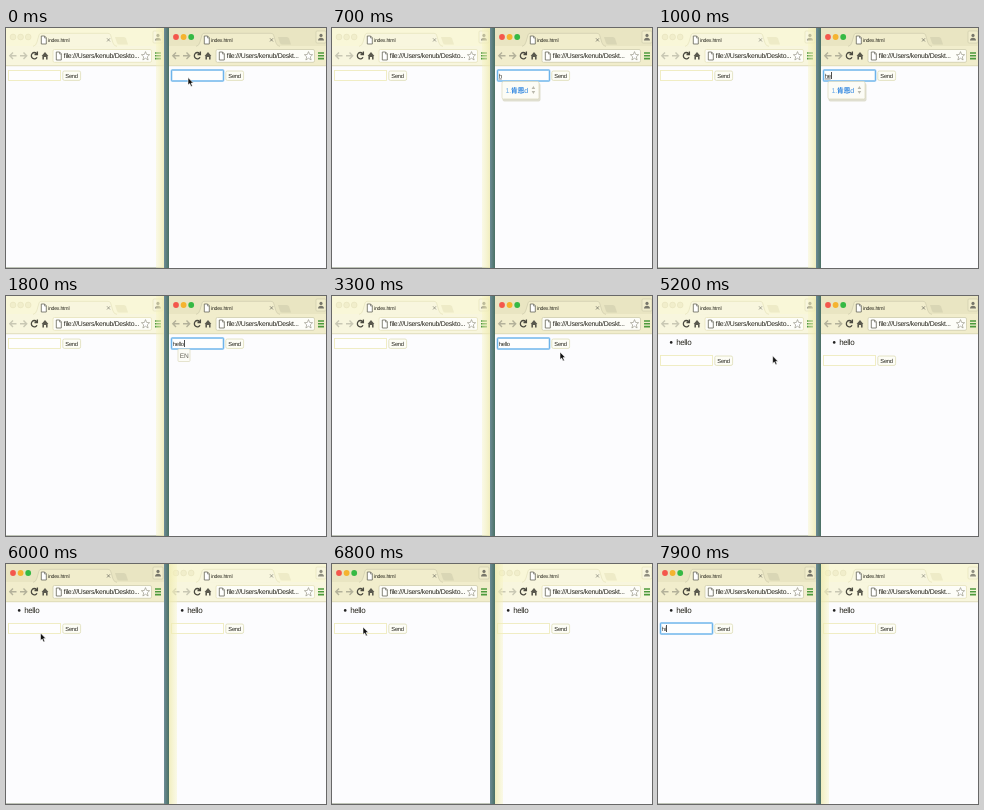
An HTML page that plays this animation: 320x240 px, repeating every 8 s.

```html
<!DOCTYPE html>
<html lang="en">
<head>
<meta charset="utf-8">
<title>Two chat windows</title>
<style>
html, body { margin: 0; width: 100%; height: 100%; overflow: hidden; background: #fcfcfe; }
svg { display: block; width: 320px; height: 240px; }
text { font-family: "Liberation Sans", Arial, sans-serif; fill: #26251c; letter-spacing: -.045em; text-rendering: geometricPrecision; }
.win { --strip: #f9f7d8; --bar: #f8f6de; --edge: #e6e3bc; --icon: #c9c8b4; --ink: #8f8e80; }
.win.active { --strip: #e9e5c2; --bar: #f1edcc; --edge: #cfccac; --icon: #b3b19a; --ink: #77766a; }
.strip { fill: var(--strip); }
.bar { fill: var(--bar); }
.tab { fill: var(--bar); stroke: var(--edge); stroke-width: .7; }
.plus { fill: var(--edge); opacity: .6; }
.light { fill: #f1eecb; stroke: #e2dfb8; stroke-width: .5; }
.active .light { fill: var(--c); stroke: none; }
.line { fill: none; stroke: var(--ink); stroke-width: .8; }
.user { fill: var(--ink); }
.dim { fill: none; stroke: var(--icon); stroke-width: 1.4; }
.dark { fill: none; stroke: #4b4a40; stroke-width: 1.3; }
.url { fill: #fdfdf8; stroke: var(--edge); stroke-width: .8; }
.field { fill: #fefefe; stroke: #efecbe; stroke-width: .9; }
.ring { fill: none; stroke: #6db3ea; stroke-width: 1; }
.glow { fill: none; stroke: #b9dcf6; stroke-width: 2.2; }
.button { fill: #fdfdf6; stroke: #dedcb6; stroke-width: .8; }
.caret { fill: #222; }
.panel { fill: #fcfcf6; stroke: #dbd9bc; stroke-width: .7; }
.candidate { font-size: 7px; font-family: "Liberation Sans", "Noto Sans CJK SC", "Noto Sans CJK", sans-serif; fill: #2f86e0; }
</style>
</head>
<body>
<svg viewBox="0 0 320 240">
  <defs>
    <linearGradient id="shade">
      <stop offset="0" stop-color="#f6f3bc" stop-opacity=".35"/>
      <stop offset="1" stop-color="#eeeab0" stop-opacity=".8"/>
    </linearGradient>
    <linearGradient id="gap">
      <stop offset="0" stop-color="#6c8b96"/>
      <stop offset="1" stop-color="#4a7063"/>
    </linearGradient>
    <g id="page">
      <path d="M0 0H3.3L5 1.8V8H0Z" fill="#fff" stroke="#66655a" stroke-width=".8"/>
      <path d="M3.2 0V2H5" fill="none" stroke="#66655a" stroke-width=".6"/>
    </g>
  </defs>
  <rect x="158" width="5" height="240" fill="url(#gap)"/>
  <g id="windows"></g>
  <rect y="239" width="158" height="1" fill="#bfc4b8"/>
  <rect id="shadowLeft" x="150" width="8" height="240" fill="url(#shade)"/>
  <rect id="shadowRight" x="-171" width="8" height="240" fill="url(#shade)" transform="scale(-1 1)"/>
  <g id="candidates">
    <rect x="170.5" y="55" width="38" height="18.5" rx="2" fill="#a8a578" opacity=".35"/>
    <rect class="panel" x="170" y="53.5" width="37" height="17.5" rx="1.5"/>
    <text class="candidate" x="173.6" y="64.8"><tspan fill-opacity=".7">1.</tspan><tspan font-weight="bold">肯恩</tspan>d</text>
    <path d="M199.6 61L201.4 58L203.2 61ZM199.6 63L201.4 66L203.2 63Z" fill="#b9b8ac"/>
  </g>
  <g id="mode">
    <rect class="panel" x="172" y="53" width="12" height="12.5" rx="1"/>
    <text x="173.8" y="62" font-size="6.6" style="fill:#666558">EN</text>
  </g>
  <path id="pointer" d="M0 0V7.6L1.7 6.1L3 9L4.4 8.4L3.1 5.6H5.4Z" fill="#111" stroke="#fff" stroke-width=".6"/>
</svg>
<script>
const LOOP = 8000;
const $ = id => document.getElementById(id);

function windowMarkup(x, width, address) {
  const lights = ['#f4574c', '#f5b32f', '#35b944'].map((color, i) =>
    `<circle class="light" style="--c:${color}" cx="${7 + i * 7.6}" cy="9" r="2.9"/>`).join('');
  return `<g class="win" transform="translate(${x})">
    <rect width="${width}" height="240" fill="#fcfcfe"/>
    <rect class="strip" width="${width}" height="18.5"/>
    <rect class="bar" y="18" width="${width}" height="20"/>
    ${lights}
    <path class="tab" d="M27 18.4Q30 18 31 14L33 7Q33.6 5.3 35 5.3H102Q104 5.3 104.6 7L107 15Q108 18 111 18.4"/>
    <path class="plus" d="M109 9H118Q119.5 9 120 10.5L122 16.5H113Q111.5 16.5 111 15Z"/>
    <use href="#page" x="35.3" y="8"/>
    <text x="42" y="14.2" font-size="5.2">index.html</text>
    <path class="line" d="M101 10.3L104 13.5M104 10.3L101 13.5"/>
    <rect class="tab" x="147" y="3" width="10" height="12" rx="1"/>
    <circle class="user" cx="152" cy="7.4" r="1.6"/>
    <path class="user" d="M149 12.4Q149.2 9.8 152 9.8T155 12.4Z"/>
    <path class="dim" d="M10.5 27.8H4M7 24.5L3.8 27.8L7 31M14 27.8H20.5M17.5 24.5L20.7 27.8L17.5 31"/>
    <path class="dark" d="M30.6 25.6A3 3.2 0 1 0 31 29.2M31.4 23.5V26.5H28.5"/>
    <path d="M35.6 28L39 23.9L42.4 28H41.6V31.5H40V29H38V31.5H36.4V28Z" fill="#5a594e"/>
    <rect class="url" x="47" y="21.5" width="98.5" height="12.8" rx="1.5"/>
    <use href="#page" x="50.3" y="24"/>
    <text x="57.8" y="30.4" font-size="6.9">${address}</text>
    <path d="M139.5 23.6L140.7 26.5L143.6 26.7L141.3 28.8L142.1 32L139.5 30.2L136.9 32L137.7 28.8L135.4 26.7L138.3 26.5Z" fill="#fff" stroke="#9a998a" stroke-width=".7"/>
    <path d="M149 25H155M149 27.8H155M149 30.6H155" stroke="#4d9a3c" stroke-width="1.6"/>
    <rect y="37.4" width="${width}" height=".8" fill="#d9d6b4"/>
    <g class="item">
      <circle cx="13.2" cy="46.4" r="1.3" fill="#222"/>
      <text x="18.2" y="48.8" font-size="8">hello</text>
    </g>
    <g class="form">
      <rect class="field" x="2.5" y="42.5" width="52" height="10"/>
      <g class="focus">
        <rect class="glow" x="2.5" y="42" width="52" height="11" rx="1"/>
        <rect class="ring" x="2.5" y="42" width="52" height="11" rx=".6"/>
      </g>
      <text class="typed" x="3.8" y="49.8" font-size="5.8"></text>
      <rect class="under" x="3.8" y="50.6" height=".7" fill="#444"/>
      <rect class="caret" y="44" width=".8" height="7"/>
      <rect class="button" x="56.8" y="43" width="17.8" height="9.4" rx="1.6"/>
      <text x="59.3" y="49.8" font-size="5.8">Send</text>
    </g>
  </g>`;
}

$('windows').innerHTML =
  windowMarkup(0, 158, 'file:///Users/kenub/Deskto...') +
  windowMarkup(163, 157, 'file:///Users/kenub/Deskt...');
const [left, right] = document.querySelectorAll('.win');

// [start, end, x, y]: glide to x, y between start and end
const moves = [
  [0, 0, 182, 49.5], [2500, 3100, 228, 56], [3700, 4000, 227.5, 47],
  [4700, 5600, 34.5, 69], [6400, 6700, 31, 63]
];
const rightTyping = [[400, 'h'], [800, 'he'], [1200, ''], [1400, 'h'], [1500, 'he'],
  [1600, 'hel'], [1700, 'hell'], [1800, 'hello'], [4100, '']];
const leftTyping = [[7400, 'h'], [7600, 'hi']];

const within = (t, a, b) => t >= a && t < b;
const show = (el, on) => { el.style.display = on ? '' : 'none'; };
const typedAt = (keys, t) => keys.reduce((text, [at, value]) => t >= at ? value : text, '');

function pointerAt(t) {
  let [x, y] = moves[0].slice(2);
  for (const [start, end, toX, toY] of moves.slice(1)) {
    const p = Math.min(1, Math.max(0, (t - start) / (end - start)));
    const ease = p * p * (3 - 2 * p);
    x += (toX - x) * ease;
    y += (toY - y) * ease;
  }
  return [x, y];
}

function drawWindow(win, t, { active, focused, text, composing }) {
  const part = name => win.querySelector('.' + name);
  const listed = t >= 4300;
  win.classList.toggle('active', active);
  show(part('item'), listed);
  part('form').setAttribute('transform', `translate(0 ${listed ? 17 : 0})`);
  show(part('focus'), focused);
  part('typed').textContent = text;
  const width = text ? part('typed').getComputedTextLength() : 0;
  part('under').setAttribute('width', composing ? width : 0);
  part('caret').setAttribute('x', 4.2 + width);
  show(part('caret'), focused && text && (t + 200) % 1000 < 500);
}

function draw(t) {
  const leftActive = t >= 5800;
  const composing = within(t, 400, 1200);
  drawWindow(left, t, { active: leftActive, focused: t >= 6900, text: typedAt(leftTyping, t) });
  drawWindow(right, t, { active: !leftActive, focused: t < 4100, text: typedAt(rightTyping, t), composing });
  show($('shadowLeft'), !leftActive);
  show($('shadowRight'), leftActive);
  show($('candidates'), composing);
  show($('mode'), within(t, 1300, 2200));
  show($('pointer'), !within(t, 400, 2500) && t < 7300);
  $('pointer').setAttribute('transform', `translate(${pointerAt(t)})`);
}

const begin = performance.now();
function tick() {
  draw((performance.now() - begin) % LOOP);
  requestAnimationFrame(tick);
}
tick();
</script>
</body>
</html>
```
